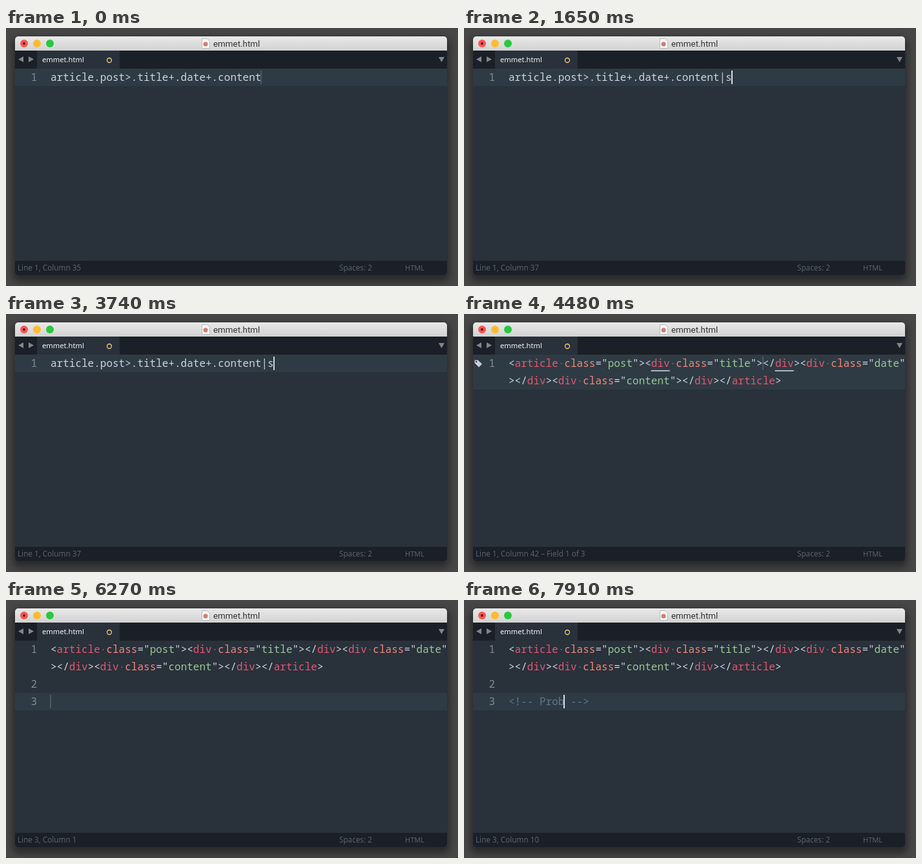
An HTML page that plays this animation: 700x400 px, repeating every 8 s.

```html
<!DOCTYPE html>
<html lang="en">
<head>
<meta charset="utf-8">
<title>emmet.html</title>
<style>
  html, body { margin: 0; width: 100%; height: 100%; overflow: hidden; background: #474747; }
  #shadow { position: absolute; left: 14px; top: 13px; width: 669px; height: 370px; border-radius: 6px;
    box-shadow: 0 6px 12px 4px rgba(0, 0, 0, .42); }
  svg { position: absolute; left: 0; top: 0; }
  text { white-space: pre; }
  .ui { font: 11.7px "Noto Sans", sans-serif; fill: #58636d; }
  .code { font: 16px "Noto Sans Mono", monospace; fill: #cdd3de; }
</style>
</head>
<body>
<div id="shadow"></div>
<svg width="700" height="400" viewBox="0 0 700 400">
  <defs>
    <linearGradient id="bar" x2="0" y2="1">
      <stop stop-color="#e9e9e9"/><stop offset="1" stop-color="#d2d2d2"/>
    </linearGradient>
    <clipPath id="frame"><rect x="14" y="13" width="669" height="370" rx="5"/></clipPath>
  </defs>
  <g clip-path="url(#frame)">
    <rect x="14" y="13" width="669" height="370" fill="#29313b"/>
    <rect x="14" y="13" width="669" height="22" fill="url(#bar)"/>
    <circle cx="28" cy="24" r="6" fill="#fc5650"/><circle cx="28" cy="24" r="2" fill="#5c0c08"/>
    <circle cx="48" cy="24" r="6" fill="#fdbc2e"/>
    <circle cx="68" cy="24" r="6" fill="#29c83f"/>
    <path d="M303.5 16.5h8l4 4v11h-12z" fill="#f6f6f6" stroke="#bdbdbd"/>
    <circle cx="309" cy="25" r="3.5" fill="#cf7f72"/>
    <text x="321" y="29" style="font:13.4px Roboto,sans-serif" fill="#333">emmet.html</text>
    <rect x="14" y="35" width="669" height="28" fill="#1b1f27"/>
    <rect x="48" y="35" width="128" height="28" fill="#29313b"/>
    <path d="M27 44v9l-8-4.500zM35 44v9l8-4.500zM670 45h9l-4.500 8z" fill="#81858a"/>
    <text x="56" y="53" class="ui" style="font-size:11.2px;font-weight:500;fill:#f4f6f8">emmet.html</text>
    <circle cx="160" cy="50" r="3.500" fill="none" stroke="#f3cf82" stroke-width="1.300"/>
    <g id="editor"></g>
    <rect x="14" y="361" width="669" height="22" fill="#1b1f27"/>
    <text id="status" x="18" y="376" class="ui"></text>
    <text x="516" y="376" class="ui" textLength="">Spaces: 2</text>
    <text x="618" y="376" class="ui" style="font-size:11px">HTML</text>
  </g>
</svg>
<script>
const LOOP = 8000, TICK = 149.15, LEFT = 69, CHAR = 9.6, TOP = 63, ROW = 27;
const abbr = 'article.post>.title+.date+.content';
const html = [
  '<article class="post"><div class="title"></div><div class="date"',
  '></div><div class="content"></div></article>'
];
const comment = word => ({ rows: [...html, '', `<!-- ${word} -->`], col: 5 + word.length });

const states = [
  { at: -740, rows: [abbr] },
  { at: 600, rows: [abbr + '|'] },
  { at: 1650, rows: [abbr + '|s'] },
  { at: 3890, rows: html, row: 0, col: 41, status: 'Line 1, Column 42 – Field 1 of 3' },
  { at: 4780, rows: html, status: 'Line 1, Column 109' },
  { at: 5530, rows: [...html, ''] },
  { at: 5680, rows: [...html, '', ''] },
  { at: 6570, ...comment('') },
  { at: 7310, ...comment('P') },
  { at: 7610, ...comment('Pr') },
  { at: 7760, ...comment('Pro') },
  { at: 7910, ...comment('Prob') }
];

const editor = document.getElementById('editor');
const status = document.getElementById('status');
const escape = s => s.replace(/</g, '&lt;').replace(/>/g, '&gt;');
const span = (fill, s) => `<tspan fill="${fill}">${s}</tspan>`;
const rect = (x, y, w, h, fill, extra = '') =>
  `<rect x="${x}" y="${y}" width="${w}" height="${h}" fill="${fill}" ${extra}/>`;
const label = (x, row, s, extra = '') =>
  `<text class="code" x="${x}" y="${TOP + 19 + ROW * row}" ${extra}>${s}</text>`;

function highlight(line) {
  if (line.startsWith('<!--')) return span('#5f7681', escape(line));
  if (!/class=/.test(line)) return escape(line);
  return line.replace(/\w+|[<> ]/g, (s, i) => {
    if (s === ' ') return span('#56707a', '·');
    if (s === '<' || s === '>') return escape(s);
    const before = line[i - 1];
    return span(before === '"' ? '#99c794' : '</'.includes(before) ? '#e5566d' : '#f2877a', s);
  });
}

function underline(row, col, length, dash = '', color = '#d8dee9', width = 2) {
  const x = LEFT + col * CHAR, y = TOP + ROW * row + 25;
  return `<path d="M${x} ${y}h${length * CHAR}" stroke="${color}" stroke-width="${width}" stroke-dasharray="${dash}"/>`;
}

// Matching tags are marked a little after the caret has moved.
function marks(t) {
  if (t < 4040 || t >= 5970) return '';
  const tag = '<path d="M16.500 71.500h5l6.500 6-5 5-6.500-6.500z" fill="#c9ced3"/><circle cx="19" cy="74" r="1.200" fill="#2f3b44"/>';
  if (t < 4780) return tag + underline(0, 23, 3, '1.500 .5') + underline(0, 43, 3, '1.500 .5');
  return tag + underline(0, 1, 7) + underline(1, 36, 7) +
    underline(1, 8, 3, '1 1', '#87939b', 1) + underline(1, 30, 3, '1 1', '#87939b', 1);
}

const blink = dt => dt < 300 ? 1 : .56 + .44 * Math.cos((dt - 1165) / 1000 * 2 * Math.PI);

function draw(t) {
  const { at, rows, row = rows.length - 1, col = rows[row].length, status: note } =
    states.findLast(s => s.at <= t);
  const first = rows.length === 2 ? 0 : row;
  const number = Math.max(1, rows.length - 1);
  const numbers = rows.map((_, i) => i === 1 ? '' : label(38.500, i, i || 1, 'style="fill:#7f8b92"'));
  editor.innerHTML =
    rect(14, TOP + ROW * first, 669, ROW * (rows.length - first), '#2f3b44') +
    numbers.join('') +
    rows.map((line, i) => label(LEFT, i, highlight(line))).join('') +
    marks(t) +
    rect(Math.floor(LEFT + CHAR * col - .55), TOP + 3 + ROW * row, 2, 21, '#d8dee9', `opacity="${blink(t - at)}"`);
  status.textContent = note || `Line ${number}, Column ${col + 1}`;
}

let last = -1;
function frame(now) {
  const t = Math.floor(now % LOOP / 10) * 10;
  const tick = Math.floor(t / TICK);
  if (tick !== last) draw(Math.ceil(tick * TICK / 10) * 10);
  last = tick;
  requestAnimationFrame(frame);
}
frame(performance.now());
</script>
</body>
</html>
```
